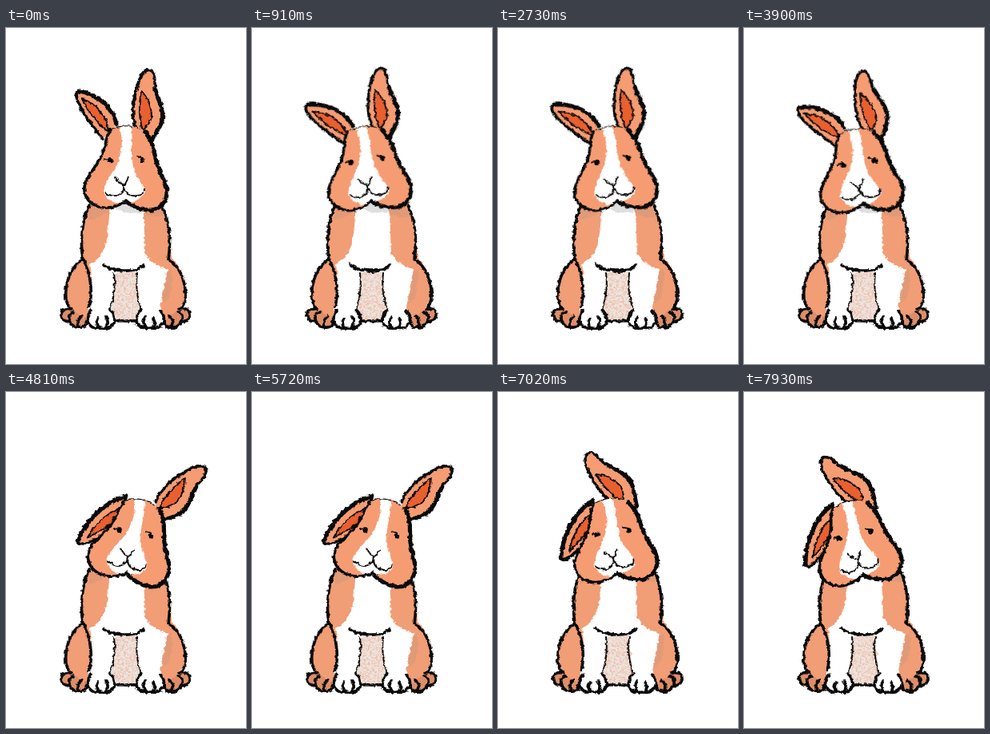
Write an HTML page that moves like this. It is 300 px wide and 421 px high and loops after 8000 ms.

```html
<!DOCTYPE html>
<html lang="en">
<head>
<meta charset="utf-8">
<title>Rabbit</title>
<style>
  html, body { margin: 0; width: 100%; height: 100%; overflow: hidden; background: #fff; }
  svg { display: block; width: 100vw; height: 100vh; }
  .fur { fill: #f19d75; }
  #head .fur { fill: #f59c73; }
  .toes { fill: #dd8e68; }
  .white { fill: #fff; }
  .pink { fill: #e9602f; }
  .shade { fill: #e09a78; }
  .ink { stroke: #0a0a0a; stroke-width: 3.6; stroke-linecap: round; stroke-linejoin: round; }
  .line { fill: none; }
  .thick { stroke-width: 5.2; }
  .thin { stroke-width: 2; }
</style>
</head>
<body>
<svg viewBox="0 0 300 421">
  <defs>
    <filter id="rough" filterUnits="userSpaceOnUse" x="0" y="0" width="300" height="421" color-interpolation-filters="sRGB">
      <feTurbulence class="noise" type="fractalNoise" baseFrequency=".2" numOctaves="2"/>
      <feDisplacementMap in="SourceGraphic" scale="4.5" xChannelSelector="R" yChannelSelector="G"/>
      <feGaussianBlur stdDeviation=".4"/>
    </filter>
    <filter id="grain" color-interpolation-filters="sRGB">
      <feTurbulence class="noise" type="fractalNoise" baseFrequency=".4" numOctaves="2"/>
      <feColorMatrix values="0 0 0 0 0  0 0 0 0 0  0 0 0 0 0  5 0 0 0 -2.2"/>
      <feComposite in="SourceGraphic" operator="in"/>
    </filter>
    <path id="belly" d="M136 307Q150 304 163 306L171 366H135L131 350Z"/>
  </defs>

  <g filter="url(#rough)">
    <!-- body -->
    <path class="fur" d="M104 220C97 238 92 262 96 290C82 298 73 318 75 340Q80 360 100 370H197Q223 352 225 328C225 312 217 298 207 288C206 262 202 240 196 222Z"/>
    <path class="white" d="M130 222C128 246 128 262 123 276Q117 290 105 296Q110 322 103 352L101 368Q115 380 134 372H167Q182 380 196 370L193 350Q197 325 202 302Q180 296 174 282C173 262 173 240 171 226Z"/>
    <path class="shade" d="M202 306Q198 328 195 346L204 337Q209 315 207 302ZM105 222H130L126 231Q114 240 103 240ZM171 226H198V236Q184 240 173 232Z"/>
    <path fill="#dedede" d="M130 222Q150 236 172 230L171 218Z"/>
    <use href="#belly" fill="#ece5e1"/>
    <use href="#belly" fill="#f1b59c" opacity=".75" filter="url(#grain)"/>
    <path class="ink line" d="M122 296Q128 303 146 304Q166 305 172 297M136 367H168M97 290Q111 322 104 349"/>
    <g id="side">
      <path class="ink line" d="M104 222C97 238 92 262 96 290C82 298 73 318 75 340Q78 352 86 358"/>
      <path class="ink line thin" d="M135 307Q138 328 131 350"/>
      <path class="toes ink" d="M82 352Q68 350 69 360Q70 368 80 368Q84 376 92 375Q101 376 101 367"/>
      <path class="ink line" d="M84 356Q76 358 80 368M95 361Q88 365 91 374"/>
      <path class="white ink" d="M106 354Q99 362 103 370Q108 378 118 376Q132 378 136 368Q136 358 130 353"/>
      <path class="ink line" d="M115 364Q111 371 116 376M125 362Q130 369 124 376"/>
    </g>
    <use href="#side" transform="translate(299) scale(-1 1)"/>

    <!-- head -->
    <g id="head">
      <g id="leftEar">
        <path class="fur ink" d="M121 139C108 122 92 103 88 86Q88 77 96 79C110 83 128 94 136 113L138 121"/>
        <path class="ink line thick" d="M92 79C110 83 128 94 136 113L138 121"/>
        <path class="pink ink thin" d="M95 89C114 95 127 111 129 131Q110 118 95 89Z"/>
      </g>
      <g id="rightEar">
        <path class="fur ink" d="M163 126C156 112 158 88 167 64Q174 50 181 53Q187 58 186 74C190 90 198 104 195 116C192 128 186 132 180 144"/>
        <path class="ink line thick" d="M187 78C191 91 198 104 195 116C192 128 186 132 180 144"/>
        <path class="pink ink thin" d="M169 79Q182 92 182 112Q179 122 171 128Q164 108 169 79Z"/>
      </g>
      <path class="fur" d="M131 127Q126 134 124 146C121 164 108 176 100 192C94 206 101 219 116 224C130 228 142 222 150 217C156 223 170 229 183 228C197 225 204 212 200 197C195 184 188 174 186 158C184 142 177 130 168 126Q150 119 131 127Z"/>
      <path class="white" d="M142 123C146 140 146 152 140 168C134 182 124 190 122 206Q132 224 150 218Q168 218 174 206C170 192 160 186 158 168C156 150 158 136 155 122Z"/>
      <path class="ink line" d="M131 127Q126 134 124 146C121 164 108 176 100 192C94 206 101 219 116 224C130 228 142 222 150 217"/>
      <path class="ink line thick" d="M150 217C156 223 170 229 183 228C197 225 204 212 200 197C195 184 188 174 186 158C184 146 179 136 174 130"/>
      <path class="ink line" style="stroke-width:1.2" d="M131 127Q150 119 168 126"/>
      <path class="ink line thin" d="M137 188Q141 194 148 197Q151 192 153 187M147 197V203Q138 216 124 206M148 202Q152 212 164 210Q173 209 172 202M124 165L130 163M164 161L170 163"/>
      <circle cx="130.500" cy="166" r="3.200"/>
      <circle cx="170.500" cy="165.500" r="3.200"/>
    </g>
  </g>
</svg>
<script>
const LOOP = 8000, STEP = 130, FIRST_STEP = 2;
const [head, leftEar, rightEar] = ['head', 'leftEar', 'rightEar'].map(id => document.getElementById(id));
const noises = document.querySelectorAll('.noise');

// Eased progress from 0 to 1 between two times.
function ramp(time, start, end) {
  const p = Math.min(1, Math.max(0, (time - start) / (end - start)));
  return p * p * (3 - 2 * p);
}

function draw(now) {
  // The opening drawing is held until the third step has passed.
  const step = Math.max(FIRST_STEP, Math.floor(now % LOOP / STEP));
  const time = step * STEP;

  const lean = ramp(time, 390, 910);
  const dip = ramp(time, 3380, 3900);
  const droop = ramp(time, 3900, 4680);
  const swing = ramp(time, 6370, 7020);
  const settle = ramp(time, 7020, 7540);

  const tilt = -7 * lean + 18 * droop - 18 * swing - 5 * settle;
  const sink = 3 * dip + 7 * droop + 2 * settle;
  const leftTurn = -10 * lean - 86 * droop;
  const rightTurn = 2 * lean - 9 * dip + 39 * droop - 67 * swing;

  head.setAttribute('transform', `translate(0 ${sink}) rotate(${tilt} 150 222)`);
  // The left ear lengthens along its own axis as it flops down.
  leftEar.setAttribute('transform',
    `translate(${136 - 7 * droop} ${120 + 6 * droop}) rotate(${leftTurn - 138}) ` +
    `scale(${1 + 0.3 * droop} 1) rotate(138) translate(-136 -120)`);
  rightEar.setAttribute('transform', `rotate(${rightTurn} 172 134)`);
  noises.forEach(noise => noise.setAttribute('seed', 1 + step % 7));
}

const start = performance.now();
function tick() {
  draw(performance.now() - start);
  requestAnimationFrame(tick);
}
tick();
</script>
</body>
</html>
```
